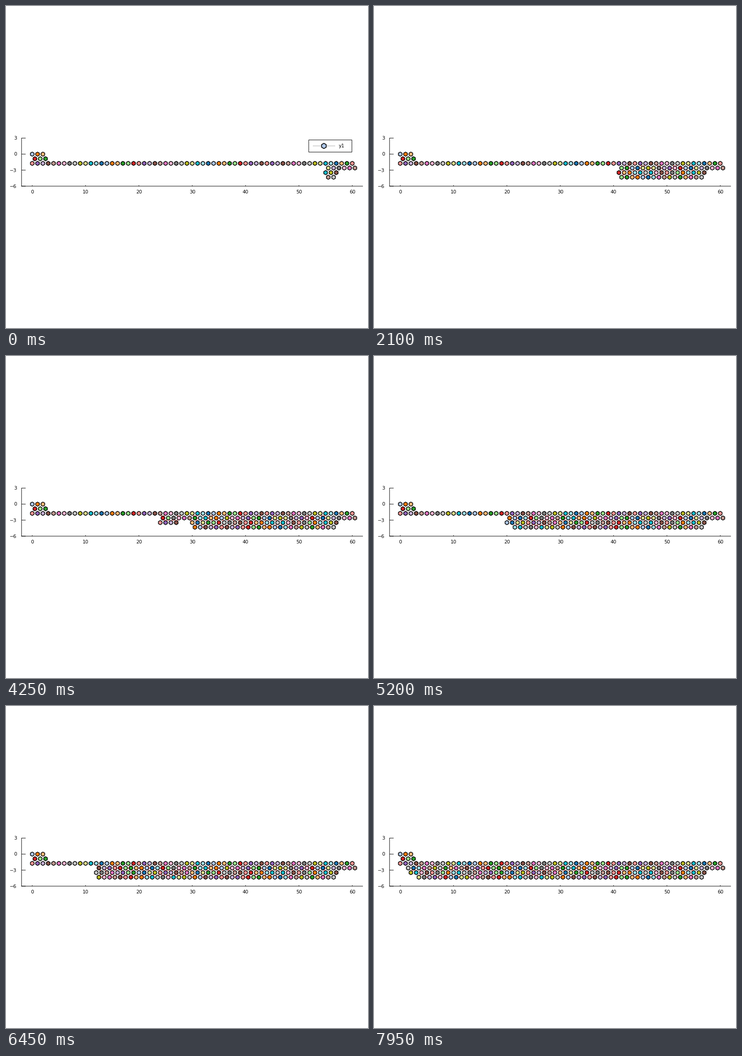
Animation, 794 px wide and 706 px high, one loop 8 s. Source, as a matplotlib script:

```python
import numpy as np
import matplotlib.pyplot as plt
from matplotlib.animation import FuncAnimation
from matplotlib.collections import LineCollection, PolyCollection
from matplotlib.patches import Rectangle

W, H, DPI = 794, 706, 100
PT = 72 / DPI              # points per pixel
FRAMES, STEP = 160, 50
X0, Y0, UNIT = 57.5, 324.8, 11.7
ROW = UNIT * np.sqrt(3) / 2
TOP, MID, LOW = 3, 4, 5    # lattice rows filled by the growing chain


def column(n, down):
    cells = [(n + .5, TOP), (n, MID), (n + .5, LOW)]
    return cells if down else cells[::-1]


def build_path():
    path = [(x, 0) for x in range(3)] + [(x + .5, 1) for x in (2, 1, 0)]
    path += [(x, 2) for x in range(61)]
    path += [(x + .5, TOP) for x in range(60, 55, -1)]
    path += [(57, MID), (56.5, LOW), (56, MID)] + column(55, True)
    seed = len(path)
    for n in range(54, 29, -1):
        path += column(n, n % 2 == 1)
    # long fold: out along the top, back in the middle, out along the bottom
    path += [(x + .5, TOP) for x in range(29, 23, -1)]
    path += [(x, MID) for x in range(24, 30)]
    path += [(x + .5, LOW) for x in range(29, 23, -1)]
    for n in range(23, 2, -1):
        path += column(n, n % 2 == 0)
    return path + [(2.5, TOP), (1.5, TOP), (2, MID)], seed


def run(first, count):
    return list(range(first, first + count))


def turn(t):
    return run(t, 8) + run(t - 6, 4) + run(t - 12, 8) + run(t - 2, 4)


def weave(four, two, count):
    """Runs of four and of two, each continuing its own count."""
    types = []
    for k in range(count):
        types += run(four + 4 * k, 4) + run(two + 2 * k, 2)
    return types


def build_colors(count):
    types = run(1, 50) + run(7, 14) + run(3, 2) + run(7, 1)
    types += run(11, 4) + run(9, 2) + run(15, 4) + run(11, 2)
    knot = run(15, 2) + [1] + run(6, 3) + [5] + run(2, 3) + run(9, 2)
    cycle = turn(19) + weave(15, 1, 5) + knot
    cycle += turn(17) + run(13, 4) + run(19, 2)
    cycle += weave(17, 1, 4) + weave(11, 9, 2)
    tab = plt.get_cmap("tab20").colors
    return [tab[t % 20] for t in (types + cycle * 2)[:count]]


def build_bonds(path, seed):
    """For every new bead, the earlier neighbours it sticks to."""
    index = {cell: i for i, cell in enumerate(path)}
    sides = [(1, 0), (-1, 0), (.5, 1), (-.5, 1), (.5, -1), (-.5, -1)]
    bonds = []
    for i in range(seed, len(path)):
        x, r = path[i]
        found = []
        for dx, dr in sides:
            j = index.get((x + dx, r + dr), i)
            along_middle = r == MID and dr == 0
            to_seed_row = r + dr == 2 and int(x) % 3
            if j < i - 1 and not along_middle and not to_seed_row:
                found.append((i, j))
        bonds.append(found)
    return bonds


def hexagon(center, radius):
    a = np.radians(np.arange(30, 390, 60))
    return np.array(center) + radius * np.column_stack([np.cos(a), np.sin(a)])


path, seed = build_path()
pts = np.array([(X0 + x * UNIT, Y0 + r * ROW) for x, r in path])
colors = build_colors(len(path))
hexes = [hexagon(p, 4.6) for p in pts]
bonds = build_bonds(path, seed)

fig = plt.figure(figsize=(W / DPI, H / DPI), dpi=DPI, facecolor="white")
ax = fig.add_axes([0, 0, 1, 1])
ax.set_xlim(0, W)
ax.set_ylim(H, 0)
ax.axis("off")


def line(xs, ys, color="black", z=1):
    return ax.plot(xs, ys, color=color, lw=PT, zorder=z, snap=False,
                   solid_capstyle="butt")[0]


def label(x, y, s, ha):
    return ax.text(x, y, s, ha=ha, va="center_baseline", fontsize=10.5 * PT,
                   family="DejaVu Sans", color="black", zorder=6)


left, right = X0 - 2 * UNIT, X0 + 62 * UNIT
top, bottom = Y0 - 3 * UNIT, Y0 + 6 * UNIT
line([left, left], [top - .5, bottom + .5])
line([left - .5, right], [bottom, bottom])
for v in range(-6, 4, 3):
    y = Y0 - v * UNIT
    line([left, left + 9], [y, y])
    label(23.5, y - .3, str(v).replace("-", "\u2212"), "right")
for v in range(0, 61, 10):
    x = X0 + v * UNIT
    line([x, x], [bottom - 2, bottom])
    label(x, 406.7, str(v), "center")

chain = line([], [], "#999999", 2)
links = LineCollection([], colors="red", linewidths=1.2 * PT, zorder=3)
beads = PolyCollection([], edgecolors="black", linewidths=1.5 * PT, zorder=4,
                       snap=False)
ax.add_collection(links, autolim=False)
ax.add_collection(beads, autolim=False)

legend = [
    ax.add_patch(Rectangle((664, 293.7), 94.7, 26.6, fc="white", ec="black",
                           lw=PT, zorder=5, snap=False)),
    line([673, 722], [306.8, 306.8], "#aaaaaa", 6),
    ax.add_patch(plt.Polygon(hexagon((697.3, 306.8), 5.8), fc=colors[0],
                             ec="black", lw=1.6 * PT, zorder=7, snap=False)),
    label(730, 306.5, "y1", "left"),
]


def draw(frame):
    n = seed + frame
    chain.set_data(pts[:n, 0], pts[:n, 1])
    links.set_segments([pts[[i, j]] for found in bonds[:frame] for i, j in found])
    beads.set_verts(hexes[:n])
    beads.set_facecolor(colors[:n])
    for part in legend:
        part.set_visible(frame == 0)
    return [chain, links, beads, *legend]


anim = FuncAnimation(fig, draw, frames=FRAMES, interval=STEP,
                     repeat=True, repeat_delay=0, blit=False)
plt.show()
```
